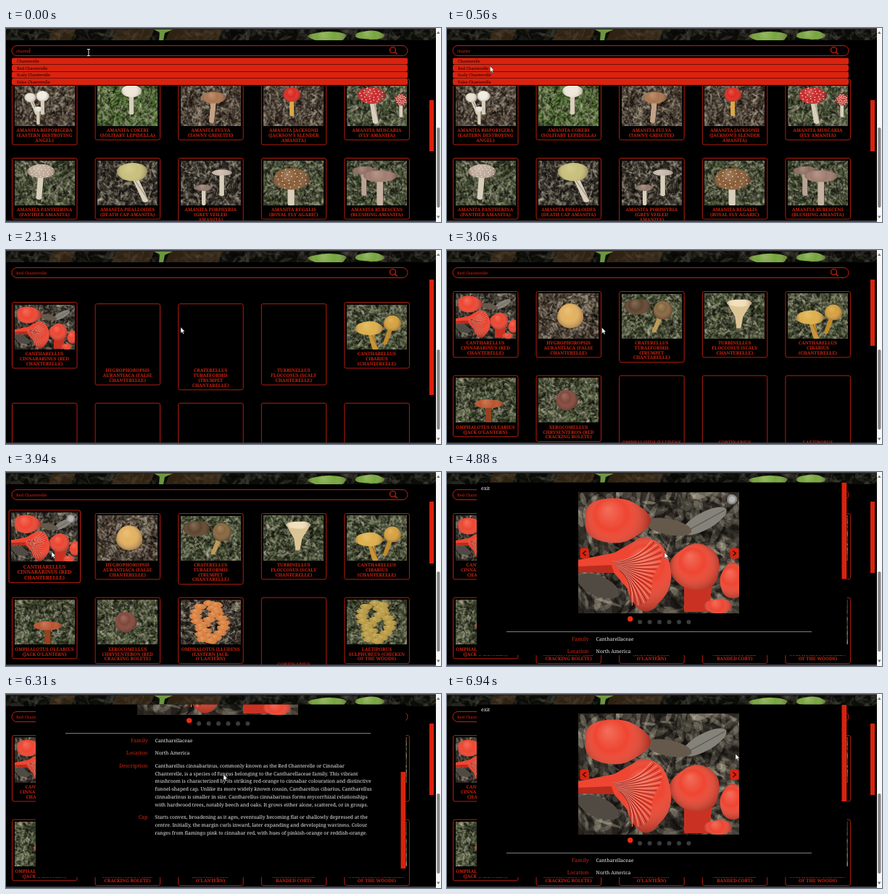
An HTML page with a canvas for the animation above (7 s loop, 600 px wide and 269 px high).

```html
<!DOCTYPE html>
<html lang="en">
<head>
<meta charset="utf-8">
<title>Mushroom search</title>
<style>
html, body { margin: 0; width: 100%; height: 100%; overflow: hidden; background: #000; }
canvas { display: block; width: 600px; height: 269px; }
</style>
</head>
<body>
<canvas id="stage"></canvas>
<script>
const LOOP = 7000, W = 600, H = 269, PAGE = 593;
const RED = '#d9230f', LINE = '#b51d0d', INK = '#d2240f';
const SERIF = '"Noto Serif", "Liberation Serif", serif';
const PICK = 860, SHOW = 2130, OPEN = 4450;
const stage = document.getElementById('stage');
const dpr = window.devicePixelRatio || 1;
stage.width = W * dpr;
stage.height = H * dpr;
let c = stage.getContext('2d');

// ---- helpers ----
function seeded(s) {
  return () => {
    s = (s * 1664525 + 1013904223) >>> 0;
    return s / 4294967296;
  };
}

const clamp = v => Math.max(0, Math.min(1, v));
const mix = (a, b, p) => a + (b - a) * p;

// Smooth 0 to 1 between two times
function ramp(t, from, to) {
  const p = clamp((t - from) / (to - from));
  return p * p * (3 - 2 * p);
}

function rect(x, y, w, h, color) {
  c.fillStyle = color;
  c.fillRect(x, y, w, h);
}

function round(x, y, w, h, r, fill, stroke) {
  c.beginPath();
  c.roundRect(x, y, w, h, r);
  if (fill) { c.fillStyle = fill; c.fill(); }
  if (stroke) { c.strokeStyle = stroke; c.lineWidth = 1; c.stroke(); }
}

function oval(x, y, rx, ry, fill, turn = 0) {
  c.beginPath();
  c.ellipse(x, y, rx, ry, turn, 0, 7);
  c.fillStyle = fill;
  c.fill();
}

function line(points, color, width) {
  c.beginPath();
  points.forEach(p => c.lineTo(...p));
  c.strokeStyle = color;
  c.lineWidth = width;
  c.stroke();
}

function poly(points, fill) {
  c.beginPath();
  points.forEach(p => c.lineTo(...p));
  c.closePath();
  c.fillStyle = fill;
  c.fill();
}

function text(s, x, y, size, color, align = 'left', weight = 400) {
  c.font = `${weight} ${size}px ${SERIF}`;
  c.textAlign = align;
  c.fillStyle = color;
  c.fillText(s, x, y);
}

function bake(w, h, paint) {
  const cv = document.createElement('canvas'), keep = c;
  cv.width = w * 2;
  cv.height = h * 2;
  c = cv.getContext('2d');
  c.scale(2, 2);
  paint();
  c = keep;
  return cv;
}

// ---- pictures ----
function litter(w, h, base, seed, size) {
  const r = seeded(seed);
  rect(0, 0, w, h, base);
  for (let i = 0; i < 5 * w * h / (size * size); i++) {
    c.globalAlpha = 0.1 + r() * 0.3;
    oval(r() * w, r() * h, size * (0.3 + r()), size * (0.1 + r() * 0.25),
      r() < 0.6 ? '#080705' : '#c4bda6', r() * 3);
  }
  c.globalAlpha = 1;
}

// Uneven rounded shape, lit from the upper left
function lump(x, y, rx, ry, color, wave = 0) {
  c.beginPath();
  for (let a = 0; a < 6.28; a += 0.1) {
    const k = 1 + wave * (Math.sin(3 * a + x) + 0.5 * Math.sin(5 * a + y));
    c.lineTo(x + Math.cos(a) * rx * k, y + Math.sin(a) * ry * k);
  }
  c.fillStyle = color;
  c.fill();
  const glow = c.createRadialGradient(x - rx / 4, y - ry / 2, 0, x, y, Math.max(rx, ry) * 1.1);
  glow.addColorStop(0, 'rgba(255,235,215,.25)');
  glow.addColorStop(0.45, 'rgba(255,235,215,0)');
  glow.addColorStop(1, 'rgba(30,0,0,.4)');
  c.fillStyle = glow;
  c.fill();
}

function mushroom(cap, x, y, r, { flat = 0.6, stem = '#d8cfbb', lean = 0, spots = false } = {}) {
  const ry = r * flat, half = 1.5 + r * 0.13, foot = Math.min(60, y + 12 + r * 1.3);
  if (stem) {
    poly([[x - half, y], [x + half, y], [x + lean + half, foot], [x + lean - half, foot]], stem);
    oval(x + lean, foot, half, half * 0.7, stem);
    line([[x + half, y + ry], [x + lean + half, foot]], 'rgba(30,15,5,.35)', 1);
  }
  lump(x, y, r, ry, cap, 0.02);
  for (let i = 1; spots && i < 30; i++) {
    const a = i * 2.4, d = Math.sqrt(i / 33);
    oval(x + Math.cos(a) * r * d, y + Math.sin(a) * ry * d, 0.9, 0.7, '#eedfcb');
  }
}

function cluster(cap) {
  for (let i = 0; i < 24; i++) {
    const v = i / 23, spread = 21 * Math.sin(0.5 + v * 2.3);
    lump(40 + spread * Math.sin(i * 2.2), mix(5, 57, v), 9, 4, cap, 0.05);
  }
}

const GROUND = { leaf: '#55463a', grass: '#587d38', moss: '#4b5839', dark: '#36302a' };

function thumb(title, ground, paint) {
  return bake(83, 62, () => {
    const seed = [...title].reduce((s, ch) => s * 31 + ch.charCodeAt(0) >>> 0, 7);
    litter(83, 62, GROUND[ground], seed, 5);
    paint();
  });
}

const bigPhoto = bake(222, 168, () => {
  const flesh = '#ee4632';
  litter(222, 168, '#37322c', 91, 15);
  oval(174, 40, 34, 12, '#85827a', -0.5);
  line([[146, 56], [202, 25]], '#4c4943', 1);
  oval(125, 48, 32, 11, '#65594c', 0.2);
  oval(28, 130, 30, 14, '#514a43', 0.4);
  poly([[146, 120], [186, 120], [180, 166], [146, 166]], '#c93223');
  lump(213, 123, 17, 25, flesh, 0.03);
  lump(193, 158, 19, 10, flesh, 0.03);
  lump(162, 104, 34, 32, flesh, 0.04);
  lump(52, 39, 45, 31, flesh, 0.05);
  poly([[0, 94], [50, 84], [85, 64], [90, 160], [50, 112], [0, 111]], flesh);
  lump(96, 113, 31, 51, flesh, 0.04);
  poly([[0, 103], [46, 101], [50, 112], [0, 111]], '#b92c1e');
  for (let i = 0; i < 30; i++) {
    const a = mix(-0.6, 1.25, i / 29), d = 60 + 6 * Math.sin(i / 3);
    c.beginPath();
    c.moveTo(48 + i * 0.3, 96 + i * 0.4);
    c.quadraticCurveTo(78, 96 + i, 52 + Math.cos(a) * d, 101 + Math.sin(a) * d);
    c.strokeStyle = i % 2 ? '#94221a' : '#f6937f';
    c.lineWidth = 1;
    c.stroke();
  }
});

const banner = bake(PAGE, 15, () => {
  litter(PAGE, 15, '#15160f', 17, 9);
  rect(0, 0, PAGE, 15, 'rgba(8,9,5,.6)');
  [80, 178, 262].forEach((x, i) => {
    const w = 16 + i * 10;
    poly([[x - w, 0], [x + w, 0], [x + w - 6, 15], [x - w - 6, 15]], 'rgba(84,58,32,.5)');
  });
  poly([[204, 0], [230, 0], [219, 5], [217, 15], [211, 15], [212, 4]], '#6c963f');
  lump(444, 10, 26, 7, '#76a63f', 0.05);
  lump(502, 8, 20, 6, '#76a63f', 0.05);
});

const start0 = [
  ['AMANITA BISPORIGERA|(EASTERN DESTROYING|ANGEL)', 'leaf', () => {
    mushroom('#e6e3d4', 22, 23, 8, { flat: 0.8, lean: 9 });
    mushroom('#f0eee4', 39, 21, 9, { flat: 0.8 });
    mushroom('#e8e5d9', 33, 39, 6);
  }],
  ['AMANITA COKERI|(SOLITARY LEPIDELLA)', 'grass', () => mushroom('#eeeade', 47, 14, 14, { spots: true })],
  ['AMANITA FULVA|(TAWNY GRISETTE)', 'leaf', () => mushroom('#a8754f', 46, 23, 16, { flat: 0.5, stem: '#c3a287', lean: -3 })],
  ["AMANITA JACKSONII|(JACKSON'S SLENDER|AMANITA)", 'leaf', () => mushroom('#dd2a20', 39, 19, 12, { flat: 0.8, stem: '#dba748' })],
  ['AMANITA MUSCARIA|(FLY AMANITA)', 'moss', () => {
    mushroom('#c8282b', 75, 26, 8, { flat: 1, spots: true });
    mushroom('#c8282b', 34, 20, 19, { spots: true, lean: 6 });
  }],
  ['AMANITA PANTHERINA|(PANTHER AMANITA)', 'moss', () => mushroom('#bdaa9c', 37, 15, 19, { flat: 0.5, spots: true, lean: -3 })],
  ['AMANITA PHALLOIDES|(DEATH CAP AMANITA)', 'dark', () => mushroom('#c8c17c', 48, 16, 21, { lean: 18 })],
  ['AMANITA PORPHYRIA|(GREY VEILED|AMANITA)', 'dark', () => {
    mushroom('#917a6e', 32, 38, 11, { flat: 0.4 });
    mushroom('#c5b8ab', 57, 17, 14, { flat: 0.3 });
  }],
  ['AMANITA REGALIS|(ROYAL FLY AGARIC)', 'moss', () => mushroom('#875d38', 38, 26, 25, { spots: true })],
  ['AMANITA RUBESCENS|(BLUSHING AMANITA)', 'moss', () => {
    mushroom('#8d6d63', 24, 14, 16, { flat: 0.35, stem: '#b9a394' });
    mushroom('#a07c70', 46, 22, 23, { flat: 0.35, stem: '#c6b1a1' });
  }],
];

// Each found card: title, ground, drawing, time its picture arrives
const found0 = [
  ['CANTHARELLUS|CINNABARINUS (RED|CHANTERELLE)', 'dark', () => c.drawImage(bigPhoto, 0, 0, 83, 62), SHOW],
  ['HYGROPHOROPSIS|AURANTIACA (FALSE|CHANTERELLE)', 'leaf', () => mushroom('#e3b260', 44, 31, 18, { flat: 0.95, stem: '' }), 2500],
  ['CRATERELLUS|TUBAEFORMIS|(TRUMPET|CHANTARELLE)', 'moss', () => {
    mushroom('#5d452f', 22, 18, 18, { stem: '' });
    mushroom('#85673f', 57, 23, 13, { flat: 1, stem: '#c09a55', lean: -12 });
  }, 2700],
  ['TURBINELLUS|FLOCCOSUS (SCALY|CHANTERELLE)', 'moss', () => {
    poly([[32, 14], [64, 14], [53, 32], [50, 48], [44, 48], [42, 32]], '#dcc595');
    lump(48, 13, 17, 5, '#f0dfb8', 0.03);
  }, 2600],
  ['CANTHARELLUS|CIBARIUS|(CHANTERELLE)', 'moss', () => {
    mushroom('#d6a23e', 63, 26, 12, { flat: 0.9, stem: '#c08b2c', lean: -10 });
    mushroom('#deb04a', 31, 33, 19, { flat: 0.5, stem: '#c9953a', lean: 8 });
  }, SHOW],
  ["OMPHALOTUS OLEARIUS|(JACK O'LANTERN)", 'moss', () => mushroom('#b9542f', 46, 36, 20, { flat: 0.3, stem: '#97411f' }), 2900],
  ['XEROCOMELLUS|CHRYSENTERON (RED|CRACKING BOLETE)', 'moss', () => mushroom('#80483c', 39, 31, 15, { flat: 0.95, stem: '' }), 3000],
  ["OMPHALOTUS ILLUDENS|(EASTERN JACK-|O'LANTERN)", 'dark', () => cluster('#d9803f'), 3100],
  ['CORTINARIUS|ARMILLATUS (RED|BANDED CORT)', 'leaf', () => mushroom('#9d6845', 41, 24, 18), 4150],
  ['LAETIPORUS|SULPHUREUS (CHICKEN|OF THE WOODS)', 'moss', () => cluster('#b89b42'), 3200],
];

const toCard = ([title, ground, paint, ready = 0]) =>
  ({ lines: title.split('|'), pic: thumb(title, ground, paint), ready });
const amanitas = start0.map(toCard), results = found0.map(toCard);

// ---- page ----
const columnX = i => 8 + (i % 5) * 114.6;
const gapOf = (item, t) => t < item.ready ? 21 : 0;
const heightOf = (item, t) => 71.5 + item.lines.length * 6.8 + gapOf(item, t);

function badge(x, y, r) {
  oval(x, y, r, r, 'rgba(150,150,150,.85)');
  oval(x, y, r * 0.65, r * 0.65, 'rgba(190,190,190,.8)');
}

function card(item, i, y, t, zoom = 1) {
  const h = heightOf(item, t), gap = gapOf(item, t);
  c.save();
  c.translate(columnX(i) + 45, y + h / 2);
  c.scale(zoom, zoom);
  c.translate(-45, -h / 2);
  round(0.5, 0.5, 89.5, h - 0.5, 2.5, '#000', LINE);
  if (!gap) c.drawImage(item.pic, 3.5, 3.5, 83, 62);
  if (zoom > 1.05) badge(78, 11, 5.5);
  item.lines.forEach((s, k) => text(s, 45, 74 + gap + k * 6.8, 6.3, INK, 'center', 700));
  c.restore();
}

function firstPage(t) {
  amanitas.forEach((item, i) => card(item, i, i < 5 ? 70 : 180, t));
  rect(584, 100, 6, 71, RED);
}

// Cards rise into place; the second row follows the tallest card of the first
function resultPage(t) {
  if (t < SHOW) return;
  const p = clamp((t - SHOW) / 620), rise = 30 * (1 - p) ** 2;
  const row2 = 75 + Math.max(...results.slice(0, 5).map(item => heightOf(item, t)));
  const zoom = 1 + 0.1 * (ramp(t, 3450, 3650) - ramp(t, OPEN, OPEN + 150));
  c.globalAlpha = clamp(p * 4);
  results.forEach((item, i) => {
    const late = gapOf(item, t) ? 3 * (1 - p) : 0;
    card(item, i, (i < 5 ? 57 : row2) + rise + late, t, i ? 1 : zoom);
  });
  rect(584, 41, 6, 160 - 74 * ramp(t, 2400, 3200) + 13 * ramp(t, 4000, 4200), RED);
  c.globalAlpha = 1;
}

function searchBar(t) {
  round(8, 24.5, 546, 14, 7, '#000', '#c4200f');
  text(t < PICK ? 'chante' : 'Red Chanterelle', 14, 33.6, 5.6, INK);
  if (t < PICK && t % 1000 < 500) rect(32.5, 28, 0.7, 7, INK);
  c.strokeStyle = INK;
  c.lineWidth = 1.2;
  c.beginPath();
  c.arc(533.5, 30.5, 4, 0, 7);
  c.moveTo(536.5, 33.5);
  c.lineTo(539.8, 36.5);
  c.stroke();
}

function suggestions() {
  rect(8, 40, 546, 40, '#000');
  ['', 'Red ', 'Scaly ', 'False '].forEach((kind, i) => {
    const y = 41.5 + i * 9.5;
    round(8, y, 546, 9, 2, RED);
    text(kind + 'Chanterelle', 15, y + 6.8, 5.6, '#160200');
  });
}

function frame() {
  rect(0, 0, PAGE, 1.5, '#4b4a4c');
  rect(0, 267, PAGE, 2, '#49474a');
  rect(PAGE, 0, W - PAGE, H, '#f7f7f7');
  round(594.3, 138, 4.2, 111, 2.1, '#858585');
  poly([[594, 8], [598.6, 8], [596.3, 4.5]], '#777');
  poly([[594, 260.5], [598.6, 260.5], [596.3, 264]], '#777');
}

// ---- details panel ----
const ABOUT = [
  'Cantharellus cinnabarinus, commonly known as the Red Chanterelle or Cinnabar',
  'Chanterelle, is a species of fungus belonging to the Cantharellaceae family. This vibrant',
  'mushroom is characterized by its striking red-orange to cinnabar colouration and distinctive',
  'funnel-shaped cap. Unlike its more widely known cousin, Cantharellus cibarius, Cantharellus',
  'cinnabarinus is smaller in size. Cantharellus cinnabarinus forms mycorrhizal relationships',
  'with hardwood trees, notably beech and oaks. It grows either alone, scattered, or in groups.',
];
const CAP_NOTES = [
  'Starts convex, broadening as it ages, eventually becoming flat or shallowly depressed at the',
  'centre. Initially, the margin curls inward, later expanding and developing waviness. Colour',
  'ranges from flamingo pink to cinnabar red, with hues of pinkish-orange or reddish-orange.',
];
const ENTRIES = [
  ['Family', ['Cantharellaceae']],
  ['Location', ['North America']],
  ['Description', ABOUT],
  ['Cap', CAP_NOTES],
];

function entries() {
  let y = 233.8;
  for (const [label, lines] of ENTRIES) {
    text(label, 195.5, y, 7.2, INK, 'right');
    lines.forEach((s, i) => text(s, 205.5, y + i * 10.8, 6.75, '#ececec'));
    y += 6.7 + lines.length * 10.8;
  }
}

function arrowButton(x, dir) {
  round(x, 105.5, 12, 14.5, 2.5, RED);
  line([-1, 0, 1].map(k => [x + 6 + dir * (k ? -2 : 2), 112.8 + k * 3.2]), '#2a0602', 1.3);
}

function panel(t) {
  if (t < OPEN) return;
  const scroll = 187 * ramp(t, 5010, 5760) - 186 * ramp(t, 6150, 6940);
  c.save();
  c.globalAlpha = ramp(t, OPEN, OPEN + 150);
  c.beginPath();
  c.rect(41, 14.5, 510.5, 239.5);
  c.clip();
  rect(41, 14, 511, 241, '#000');
  c.translate(0, -scroll);
  text('exit', 47, 25, 6.9, '#f2f2f2');
  c.drawImage(bigPhoto, 180.5, 28, 222.5, 168);
  arrowButton(183.5, -1);
  arrowButton(390.5, 1);
  if (t < 5400) badge(393, 38, 7);
  oval(252.7, 203.8, 3.7, 3.7, '#ef2b16');
  for (let i = 1; i < 7; i++) oval(252.7 + i * 13.45, 208, 3, 3, '#3b3b3b');
  rect(82, 221, 421, 0.9, '#8d8d8d');
  entries();
  c.translate(0, scroll);
  rect(544.5, 14.5 + scroll * 0.56, 7, 134, RED);
  c.restore();
}

// ---- pointer ----
// Each move: begin, end, x, y
const MOVES = [
  [60, 720, 50, 56],
  [880, 1080, 59, 53.5],
  [1450, 2300, 241, 107],
  [2900, 3550, 63, 110.5],
  [OPEN, 4820, 300, 111.5],
  [6450, 6920, 398, 83],
];

function pointer(t) {
  let x = 114, y = 34;
  for (const [from, to, nx, ny] of MOVES) {
    const p = ramp(t, from, to);
    x = mix(x, nx, p);
    y = mix(y, ny, p);
  }
  c.save();
  c.translate(x, y);
  if (y < 39) {
    line([[0, -4.5], [0, 4.5]], '#e8e8e8', 1);
    [-4.5, 4.5].forEach(k => line([[-2, k], [2, k]], '#e8e8e8', 1));
  } else {
    poly([[0, 0], [0, 8.2], [1.9, 6.6], [3.2, 9.4], [4.5, 8.8], [3.2, 6.1], [5.6, 5.9]], '#fff');
    c.strokeStyle = '#222';
    c.lineWidth = 0.5;
    c.stroke();
  }
  c.restore();
}

function draw(t) {
  c.setTransform(dpr, 0, 0, dpr, 0, 0);
  c.textRendering = 'geometricPrecision';
  rect(0, 0, W, H, '#000');
  if (t < PICK) firstPage(t);
  resultPage(t);
  c.drawImage(banner, 0, 2, PAGE, 15);
  searchBar(t);
  if (t < PICK) suggestions();
  frame();
  panel(t);
  pointer(t);
}

const begin = performance.now();
function tick() {
  draw((performance.now() - begin) % LOOP);
  requestAnimationFrame(tick);
}
tick();
</script>
</body>
</html>
```
